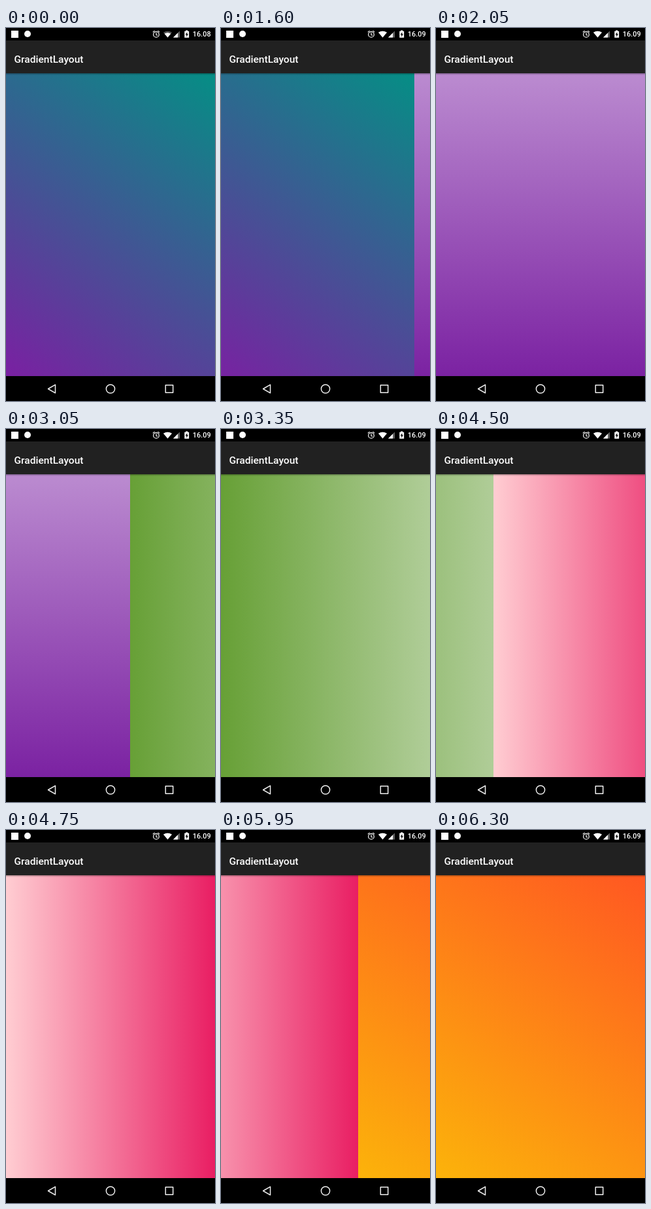
An HTML page for the animation above (6350 ms loop, 320 by 569 pixels).

```html
<!DOCTYPE html>
<html lang="en">
<head>
<meta charset="utf-8">
<title>GradientLayout</title>
<style>
  html, body { margin: 0; width: 100%; height: 100%; overflow: hidden; background: #000; }
  svg { display: block; width: 100%; height: 100%; }
  text { font-family: Roboto, sans-serif; font-weight: 500; fill: #fff; }
</style>
</head>
<body>
<svg viewBox="0 0 320 569">
  <defs id="defs">
    <linearGradient id="shadow" x2="0" y2="1">
      <stop stop-opacity=".32"/>
      <stop offset="1" stop-opacity="0"/>
    </linearGradient>
  </defs>

  <g id="pages"></g>

  <rect y="69" width="320" height="3" fill="url(#shadow)"/>
  <rect width="320" height="19"/>
  <rect y="19" width="320" height="50" fill="#212121"/>
  <rect y="531" width="320" height="38"/>
  <text x="12.5" y="53" font-size="15.56">GradientLayout</text>

  <!-- status bar -->
  <g fill="#fff">
    <rect x="8" y="4" width="11" height="11"/>
    <circle cx="33" cy="9" r="5"/>
    <path d="M247.5 14.5L241 6.8Q247.5 2.6 254 6.8Z" fill="#555"/>
    <path id="wifi" d="M247.5 14.5L241 6.8Q247.5 2.6 254 6.8Z"/>
    <path d="M256 14.5H266V4.5Z" fill="#666"/>
    <path d="M256 14.5H263V7.5Z"/>
    <path d="M273.3 4.8H275.3V3.6H278.2V4.8H280.2V14.8H273.3Z"/>
    <path d="M277.4 6.2L274.6 10.3H276.3V13.4L279 9.2H277.4Z" fill="#000"/>
  </g>
  <g fill="none" stroke="#fff" stroke-width="1.2">
    <circle cx="230" cy="9.9" r="4.3"/>
    <path d="M230 7.3V10.2L232 11.4M224.8 6.4L227.6 4.1M235.2 6.4L232.4 4.1"/>
  </g>
  <text id="clock" x="285.8" y="13.4" font-size="10.9"></text>

  <!-- navigation bar -->
  <g fill="none" stroke="#eee" stroke-width="1.5" stroke-linejoin="round">
    <path d="M64.5 550.5L75.5 544.2V556.8Z"/>
    <circle cx="160" cy="550.5" r="6.6"/>
    <rect x="244.3" y="544.8" width="11.4" height="11.4"/>
  </g>
</svg>
<script>
const LOOP = 6350, STEP = 50, WIDTH = 320, TOP = 69, BOTTOM = 531;
const byId = id => document.getElementById(id);

// Gradient line [x1, y1, x2, y2] and its two colours
const pages = [
  [[WIDTH, TOP, 0, BOTTOM], '#058e85', '#7a20a2'],
  [[0, TOP, 0, BOTTOM], '#bb8bd0', '#7b22a2'],
  [[0, 0, WIDTH, 0], '#67a036', '#b0cd98'],
  [[0, 0, WIDTH, 0], '#ffcdd2', '#e91e63'],
  [[WIDTH, TOP, 0, BOTTOM], '#ff5722', '#fcb30a']
];

// Swipes to the next page: start, number of steps, how abruptly it is flung
const swipes = [
  { start: 1600, steps: 10, fling: 1.75 },
  { start: 3000, steps: 8, fling: 2 },
  { start: 4400, steps: 8, fling: 2.26 },
  { start: 5900, steps: 9, fling: 2 }
];

pages.forEach(([[x1, y1, x2, y2], from, to], i) => {
  byId('defs').insertAdjacentHTML('beforeend',
    `<linearGradient id="page${i}" gradientUnits="userSpaceOnUse"
      x1="${x1}" y1="${y1}" x2="${x2}" y2="${y2}">
      <stop stop-color="${from}"/><stop offset="1" stop-color="${to}"/>
    </linearGradient>`);
  byId('pages').insertAdjacentHTML('beforeend',
    `<rect y="${TOP}" width="${WIDTH}" height="${BOTTOM - TOP}"
      fill="url(#page${i})" transform="translate(${i * WIDTH})"/>`);
});

function swipeProgress(time, { start, steps, fling }) {
  const u = Math.min(1, Math.max(0, ((time - start) / STEP + 1) / steps));
  if (time < start) return 0;
  const s = 1 - (1 - u) ** fling;
  return s * s * (3 - 2 * s);
}

function draw(now) {
  const time = Math.floor(now % LOOP / STEP) * STEP;
  const position = swipes.reduce((sum, swipe) => sum + swipeProgress(time, swipe), 0);
  byId('pages').setAttribute('transform', `translate(${-Math.round(position * WIDTH)})`);

  const later = time >= 350;
  byId('clock').textContent = later ? '16.09' : '16.08';
  byId('wifi').setAttribute('transform',
    later ? '' : 'translate(247.5 14.5) scale(.75) translate(-247.5 -14.5)');
}

const origin = performance.now();
function tick() {
  draw(performance.now() - origin);
  requestAnimationFrame(tick);
}
tick();
</script>
</body>
</html>
```
